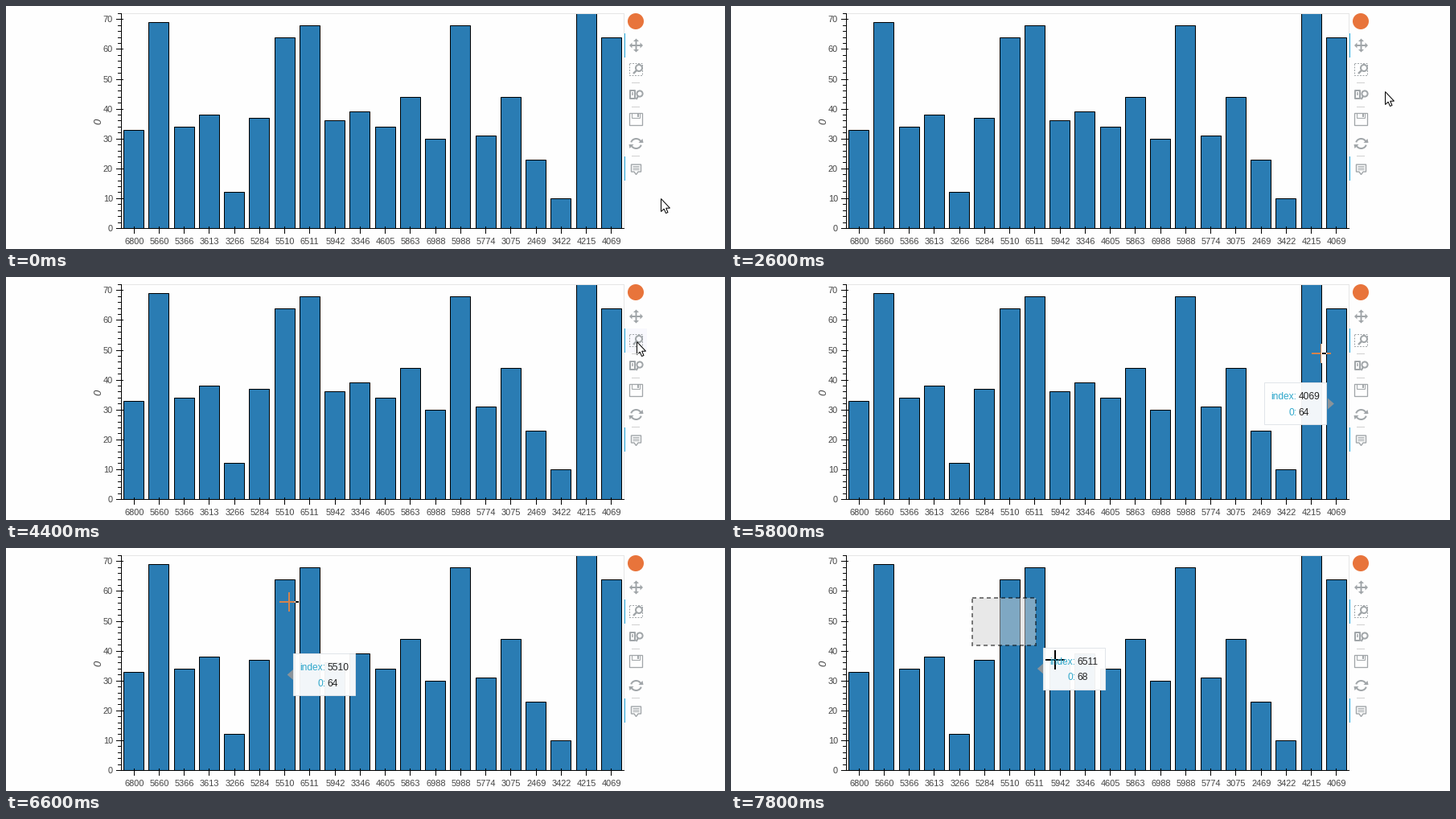
Write a matplotlib script that moves like this. It is 894x302 px and loops after 8000 ms.

```python
import numpy as np
import matplotlib.pyplot as plt
from matplotlib.animation import FuncAnimation
from matplotlib.patches import Arc, Circle, Polygon, Rectangle
from matplotlib.path import Path

W, H, DPI = 894, 302, 72  # at 72 dpi one point is one pixel
FRAMES, INTERVAL = 40, 200
LAG = 0.0466  # the page reacts this many seconds behind the pointer

BAR, BAR_INVERSE = "#2a7cb3", "#d5834c"
ICON, ACCENT, PAPER = "#a1a6a9", "#26aae1", "#fefefe"
LEFT, RIGHT, TOP, BASE = 143.5, 768.5, 9.5, 276.5
STEP, UNIT = 31.25, 3.71

LABELS = ("6800 5660 5366 3613 3266 5284 5510 6511 5942 3346 "
          "4605 5863 6988 5988 5774 3075 2469 3422 4215 4069").split()
VALUES = [33, 69, 34, 38, 12, 37, 64, 68, 36, 39,
          34, 44, 30, 68, 31, 44, 23, 10, 72, 64]

# (seconds, x, y) of the pointer
ROUTE = np.array([
    (1.6, 814, 239), (1.8, 814, 230), (2.0, 819, 205), (2.2, 826, 170),
    (2.4, 823, 135), (2.6, 813, 106), (2.8, 803, 90), (3.0, 794, 85),
    (3.2, 787, 81), (3.4, 784, 80), (5.0, 784, 80), (5.2, 781, 84),
    (5.4, 775, 91), (5.6, 765, 96), (5.8, 734, 95), (6.0, 640, 92),
    (6.2, 480, 84), (6.4, 366, 70), (6.6, 352, 67), (6.8, 338, 65),
    (7.0, 322, 63), (7.2, 308, 62), (7.4, 300, 62), (7.6, 300, 62),
    (7.8, 403, 139)])
CLICK, DRAG = 4.4, 7.7
DRAG_START = (300, 62)
ARROW = np.array([(0.5, 0.5), (0.5, 16.5), (4.2, 13.2), (6.5, 18.5),
                  (9, 17.5), (6.7, 12.2), (11.5, 12.2)])

plt.rcParams.update({"path.snap": False, "font.family": "Liberation Sans",
                     "lines.solid_capstyle": "butt", "toolbar": "None"})
fig = plt.figure(figsize=(W / DPI, H / DPI), dpi=DPI, facecolor=PAPER)
ax = fig.add_axes([0, 0, 1, 1])
ax.set(xlim=(0, W), ylim=(H, 0))
ax.axis("off")


def line(xs, ys, color="black", width=1, **style):
    return ax.plot(xs, ys, color=color, lw=width, **style)[0]


def box(x0, y0, x1, y1, fill="none", edge="none", width=1, **style):
    return ax.add_patch(Rectangle((x0, y0), x1 - x0, y1 - y0, facecolor=fill,
                                  edgecolor=edge, lw=width, **style))


def shape(points, fill=ICON, edge="none", **style):
    return ax.add_patch(Polygon(points, facecolor=fill, edgecolor=edge, **style))


def ring(x, y, r, width=2):
    ax.add_patch(Circle((x, y), r, facecolor="none", edgecolor=ICON, lw=width))


def label(x, y, text, size, ha="center", color="#444444", **style):
    return ax.text(x, y, text, size=size, ha=ha, va="baseline", color=color, **style)


def bar_box(i):
    center = LEFT + STEP * (i + 0.5)
    return (np.floor(center - 12.5) + 0.5, np.floor(BASE - UNIT * VALUES[i]) + 0.5,
            np.floor(center + 12.5) + 0.5, BASE)


def rect_path(x0, y0, x1, y1):
    return Path([(x0, y0), (x1, y0), (x1, y1), (x0, y1), (x0, y0)], closed=True)


BOXES = [bar_box(i) for i in range(len(VALUES))]


def draw_chart():
    line([LEFT, RIGHT, RIGHT], [TOP, TOP, BASE], "#e5e5e5")
    for i, bounds in enumerate(BOXES):
        box(*bounds, BAR, "black")
        x = np.floor(LEFT + STEP * (i + 0.5)) + 0.5
        line([x, x], [274, 283])
        label(x, 296, LABELS[i], 11)
    line([LEFT, LEFT], [9, 277])
    line([143, 769], [BASE, BASE])
    for v in range(0, 73, 2):
        y = np.floor(BASE - UNIT * v) + 0.5
        major = v % 10 == 0
        line([137 if major else 139, 146 if major else 143], [y, y])
        if major:
            label(133, y + 3.7, str(v), 11, "right")
    label(115, 143, "0", 13, style="italic", rotation=90).set_va("center")


def magnifier(x, y):
    ring(x, y, 4)
    line([x - 3, x - 7], [y + 3, y + 7], ICON, 2.4)


def draw_toolbar():
    ax.add_patch(Circle((783, 19), 10, color="#e8743b", lw=0))
    for y in (95.5, 125.5, 186.5):
        line([778, 788], [y, y], "#d0d0d0")

    # pan
    line([777, 790], [49, 49], ICON, 2)
    line([783.5, 783.5], [43, 55], ICON, 2)
    for dx, dy in ((1, 0), (-1, 0), (0, 1), (0, -1)):
        tip, neck = (783.5 + 8.5 * dx, 49 + 8.5 * dy), (783.5 + 5 * dx, 49 + 5 * dy)
        shape([tip, (neck[0] + 3.5 * dy, neck[1] + 3.5 * dx),
               (neck[0] - 3.5 * dy, neck[1] - 3.5 * dx)])

    # box zoom
    box(775.5, 71.5, 791.5, 86.5, edge=ICON, ls=(0, (2, 1.5)))
    magnifier(787, 77)

    # wheel zoom
    box(776, 105, 782, 115, edge=ICON, width=2, joinstyle="round")
    line([779, 779], [107, 111], ICON, 1.5)
    ring(788, 109, 3.6)
    line([786, 783.5], [112, 116], ICON, 2.2)

    # save
    box(775.5, 133.5, 791.5, 148.5, edge=ICON, width=1.3)
    box(778.5, 133.5, 788.5, 139.5, edge=ICON)
    box(785, 134, 787, 138, ICON)

    # reset
    for start in (195, 15):
        ax.add_patch(Arc((783.5, 171), 13, 12, theta1=start, theta2=start + 140,
                         edgecolor=ICON, lw=2))
    shape([(786.5, 170), (792.5, 170), (791.5, 165)])
    shape([(780.5, 172), (774.5, 172), (775.5, 177)])

    # hover
    shape([(777.5, 197), (789.5, 197), (789.5, 206), (786, 206), (783.5, 209.5),
           (781, 206), (777.5, 206)], "none", ICON, lw=1.4)
    for y in (199.5, 201.5, 203.5):
        line([779.5, 787.5], [y, y], ICON)
    box(768, 187, 770, 217, ACCENT)


class HoverCard:
    WIDTH, HEIGHT = 78, 52

    def __init__(self):
        self.arrow = shape([(0, 0)] * 3, "#909599", alpha=0.95)
        self.back = box(0, 0, self.WIDTH - 1, self.HEIGHT, PAPER, "#e0e4e8", alpha=0.95)
        self.texts = [label(0, 0, text, 12, ha, color) for text, ha, color in (
            ("index:", "right", "#2fa8cc"), ("", "left", "#222222"),
            ("0:", "right", "#2fa8cc"), ("", "left", "#222222"))]

    def show(self, i):
        for part in (self.arrow, self.back, *self.texts):
            part.set_visible(i is not None)
        if i is None:
            return
        side = 1 if i < len(VALUES) / 2 else -1
        x, y = LEFT + STEP * (i + 0.5), (BASE + BOXES[i][1]) / 2 - 0.5
        tip, foot = x + 3 * side, x + 11 * side
        self.arrow.set_xy([(tip, y), (foot, y - 7), (foot, y + 7)])
        x0 = np.floor(foot if side > 0 else foot - self.WIDTH) + 0.5
        y0 = np.floor(y - self.HEIGHT / 2) + 0.5
        self.back.set_xy((x0, y0))
        self.texts[1].set_text(LABELS[i])
        self.texts[3].set_text(str(VALUES[i]))
        for n, text in enumerate(self.texts):
            text.set_position((x0 + (42 if n % 2 else 40), y0 + (40 if n > 1 else 20.5)))

    def covers(self, x, y):
        x0, y0 = self.back.get_xy()
        return (self.back.get_visible() and x0 <= x <= x0 + self.WIDTH
                and y0 <= y <= y0 + self.HEIGHT)


class Crosshair:
    """A cross that inverts what lies below it: paper, bars and bar outlines."""

    def __init__(self):
        bars = [rect_path(*b) for b in BOXES]
        edges = [rect_path(x - 0.5, b[1], x + 0.5, b[3]) for b in BOXES for x in (b[0], b[2])]
        self.layers = []
        for color, clip in (("black", None), (BAR_INVERSE, bars), ("white", edges)):
            arms = [line([], [], color, 2) for _ in range(2)]
            if clip:
                for arm in arms:
                    arm.set_clip_path(Path.make_compound_path(*clip), ax.transData)
            self.layers.append(arms)

    def show(self, x, y, visible, on_card):
        x, y = round(x), round(y)
        for n, (across, down) in enumerate(self.layers):
            across.set_data([x - 12, x + 12], [y, y])
            down.set_data([x, x], [y - 12, y + 12])
            for arm in (across, down):
                arm.set_visible(visible and not (n and on_card))


def pointer(t):
    return tuple(np.interp(t, ROUTE[:, 0], ROUTE[:, k]) for k in (1, 2))


def bar_under(x, y):
    for i, (x0, y0, x1, y1) in enumerate(BOXES):
        if x0 <= x <= x1 and y0 <= y <= y1:
            return i
    return None


highlight = box(769, 64, 797, 94, "#f8f8fd")
draw_chart()
draw_toolbar()
active = box(768, 34, 770, 64, ACCENT)
selection = box(0, 0, 0, 0, (0.83, 0.83, 0.83, 0.5), (0, 0, 0, 0.5), 2, ls=(0, (2.5, 2)))
card = HoverCard()
hint = [box(784.5, 100.5, 850.5, 118.5, "white", "#767676"),
        label(817.5, 113.5, "Box Zoom", 12, color="#575757")]
crosshair = Crosshair()
arrow = shape(ARROW, "white", "black", lw=1)


def draw(frame):
    t = frame * INTERVAL / 1000
    x, y = pointer(t)
    seen_x, seen_y = pointer(t - LAG)
    in_plot = x < 769

    highlight.set_visible(769 <= x <= 797 and 64 <= y <= 94)
    active.set_y(64 if t >= CLICK else 34)
    for part in hint:
        part.set_visible(4.0 <= t < CLICK)
        part.set_alpha(0.5 if t < 4.1 else 1)

    selection.set_visible(t > DRAG)
    selection.set_bounds(*DRAG_START, seen_x - DRAG_START[0], seen_y - DRAG_START[1])
    card.show(bar_under(seen_x, seen_y) if in_plot else None)
    crosshair.show(x, y, in_plot, card.covers(x, y))
    arrow.set_visible(not in_plot)
    arrow.set_xy(ARROW + (round(x), round(y)))
    return []


anim = FuncAnimation(fig, draw, frames=FRAMES, interval=INTERVAL,
                     init_func=lambda: draw(0), repeat=True)
plt.show()
```
